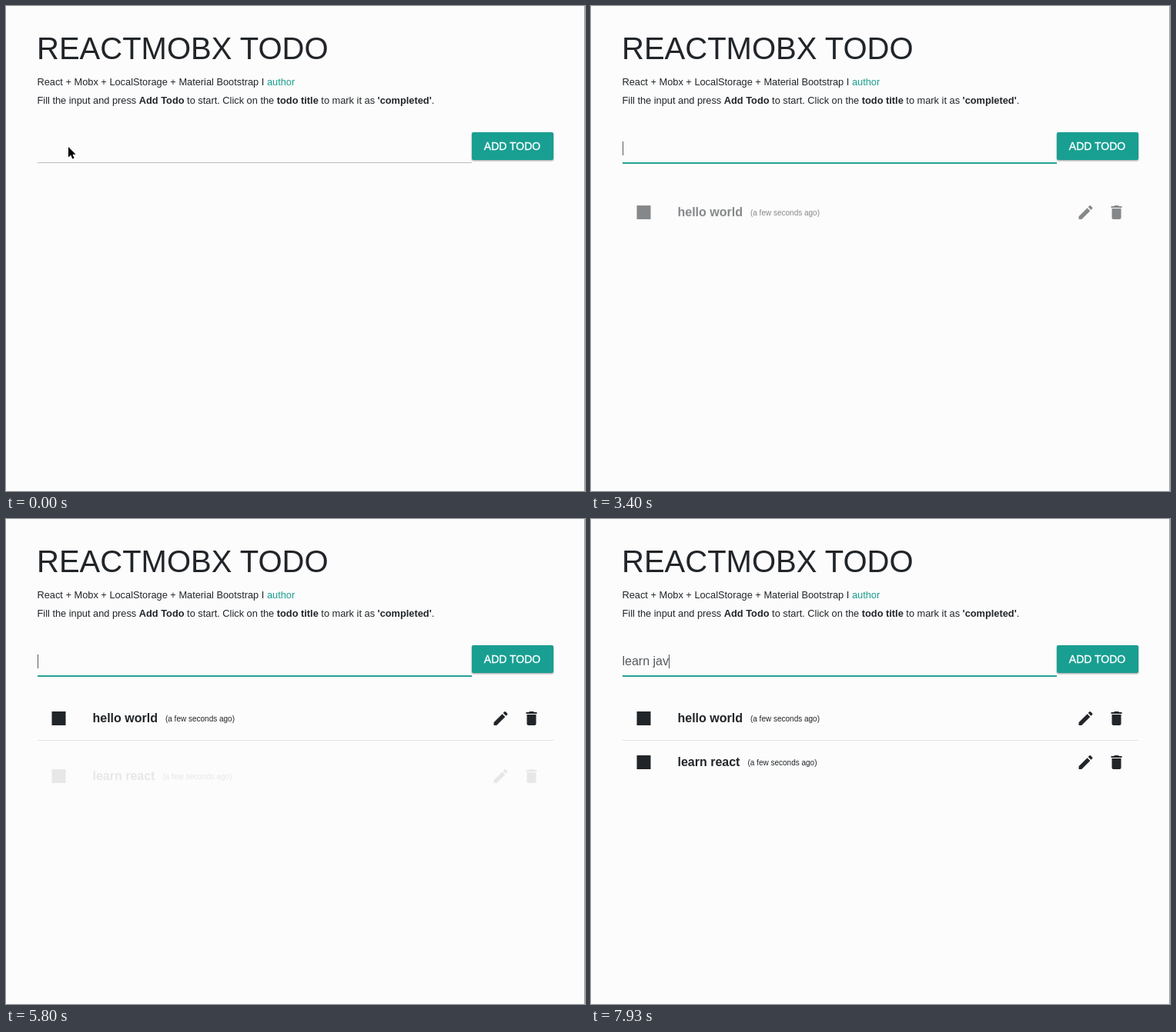
These frames come from a looping animation (752 px wide and 630 px high, 8 s). An HTML page:

```html
<!DOCTYPE html>
<html lang="en">
<head>
<meta charset="utf-8">
<title>Todo</title>
<style>
  html, body { margin: 0; width: 100%; height: 100%; overflow: hidden; background: #fcfcfc; }
  svg { display: block; width: 752px; height: 630px; font-family: "Liberation Sans", Arial, sans-serif; fill: #212529; }
  text { white-space: pre; }
  .title { font-size: 40px; }
  .note { font-size: 12.8px; }
  .link { fill: #1a9e8e; }
  b, .bold { font-weight: bold; }
  .field { font-size: 16px; fill: #55595c; }
  .button { fill: #189f92; filter: drop-shadow(0 1px 1.2px rgba(0, 0, 0, .4)); }
  .label { font-size: 14px; fill: #fff; stroke: #fff; stroke-width: .35px; }
  .name { font-size: 16px; font-weight: bold; }
  .ago { font-size: 10px; font-weight: normal; }

  .focus, .pointer, .rule, .item { animation: 8s linear infinite; }
  .focus { animation-name: focus; transform-origin: 323px 204px; }
  .pointer { animation-name: pointer; }
  .rule { animation-name: rule; }
  .first { animation-name: first; }
  .second { animation-name: second; }

  @keyframes focus {
    0% { transform: scaleX(0); }
    1.25% { transform: scaleX(0); animation-timing-function: ease-out; }
    5%, 100% { transform: scaleX(1); }
  }
  @keyframes pointer {
    0% { opacity: 1; animation-timing-function: step-end; }
    12.125%, 100% { opacity: 0; }
  }
  @keyframes rule {
    0% { opacity: 0; animation-timing-function: step-end; }
    71.25%, 100% { opacity: 1; }
  }
  @keyframes first {
    0% { opacity: 0; transform: translateY(20px); }
    38.56% { opacity: 0; transform: translateY(20px); animation-timing-function: ease; }
    51.06%, 100% { opacity: 1; transform: none; }
  }
  @keyframes second {
    0% { opacity: 0; transform: translateY(20px); }
    71.25% { opacity: 0; transform: translateY(20px); animation-timing-function: ease; }
    83.75%, 100% { opacity: 1; transform: none; }
  }
</style>
</head>
<body>
<svg viewBox="0 0 752 630">
  <defs>
    <g id="icons">
      <rect x="59.5" y="250" width="18" height="18"/>
      <path transform="translate(630.5 247)" d="M3 17.25V21h3.75L17.81 9.94l-3.75-3.75zM20.71 7.04a1 1 0 0 0 0-1.41l-2.34-2.34a1 1 0 0 0-1.41 0l-1.83 1.83 3.75 3.75z"/>
      <path transform="translate(670.5 247)" d="M6 19c0 1.1.9 2 2 2h8c1.1 0 2-.9 2-2V7H6zM19 4h-3.5l-1-1h-5l-1 1H5v2h14z"/>
    </g>
  </defs>

  <rect width="752" height="630" fill="#fcfcfc"/>
  <rect x="751" width="1" height="630" fill="#9a9a9a"/>

  <text class="title" x="40" y="68.5">REACTMOBX TODO</text>
  <text class="note" x="40.5" y="103">React + Mobx + LocalStorage + Material Bootstrap I <tspan class="link">author</tspan></text>
  <text class="note" x="40.5" y="127">Fill the input and press <tspan class="bold">Add Todo</tspan> to start. Click on the <tspan class="bold">todo title</tspan> to mark it as <tspan class="bold">'completed'</tspan>.</text>

  <rect x="41" y="203" width="564" height="1" fill="#bcbcbc"/>
  <rect class="focus" x="41" y="203" width="564" height="2" fill="#26a096"/>
  <text class="field" id="field" x="40.5" y="190"></text>
  <rect id="caret" x="41" y="176" width="1" height="18" fill="#55595c"/>

  <rect class="button" x="605" y="164" width="106" height="36" rx="2"/>
  <text class="label" x="620.8" y="187">ADD TODO</text>

  <g class="item first">
    <use href="#icons"/>
    <text class="name" x="112.5" y="264">hello world<tspan class="ago" dx="10" dy="-1">(a few seconds ago)</tspan></text>
  </g>
  <rect class="rule" x="41" y="287" width="670" height="1" fill="#e2e2e2"/>
  <g transform="translate(0 57)">
    <g class="item second">
      <use href="#icons"/>
      <text class="name" x="112.5" y="264">learn react<tspan class="ago" dx="10" dy="-1">(a few seconds ago)</tspan></text>
    </g>
  </g>

  <path class="pointer" transform="translate(81 183)" d="M0 0V13.5L3.2 10.6 5.3 15.4 7.6 14.4 5.5 9.8H9.6Z" fill="#000" stroke="#fff" stroke-width="1" paint-order="stroke"/>
</svg>
<script>
  const LOOP = 8000, FOCUS = 100, BLINK = 500;
  const keys = "hello world\nlearn react\nlearn jav";
  const times = [
    970, 1470, 1600, 1670, 1800, 1930, 2070, 2190, 2325, 2470, 2600, 3085,
    4200, 4265, 4470, 4560, 4650, 4740, 4830, 4930, 5030, 5120, 5270, 5700,
    6530, 6670, 6800, 6925, 7070, 7195, 7470, 7640, 7860
  ];
  const field = document.getElementById("field");
  const caret = document.getElementById("caret");
  let start;

  function draw(now) {
    start ??= now;
    const t = (now - start) % LOOP;
    const count = times.filter(time => time <= t).length;
    const last = count ? times[count - 1] : FOCUS;
    const text = keys.slice(0, count).split("\n").pop();

    if (field.textContent !== text) field.textContent = text;
    const width = text ? field.getComputedTextLength() : 0;
    caret.setAttribute("x", Math.floor(41 + width));
    const on = t >= FOCUS && Math.floor((t - last) / BLINK) % 2 === 0;
    caret.setAttribute("visibility", on ? "visible" : "hidden");
    requestAnimationFrame(draw);
  }
  requestAnimationFrame(draw);
</script>
</body>
</html>
```
